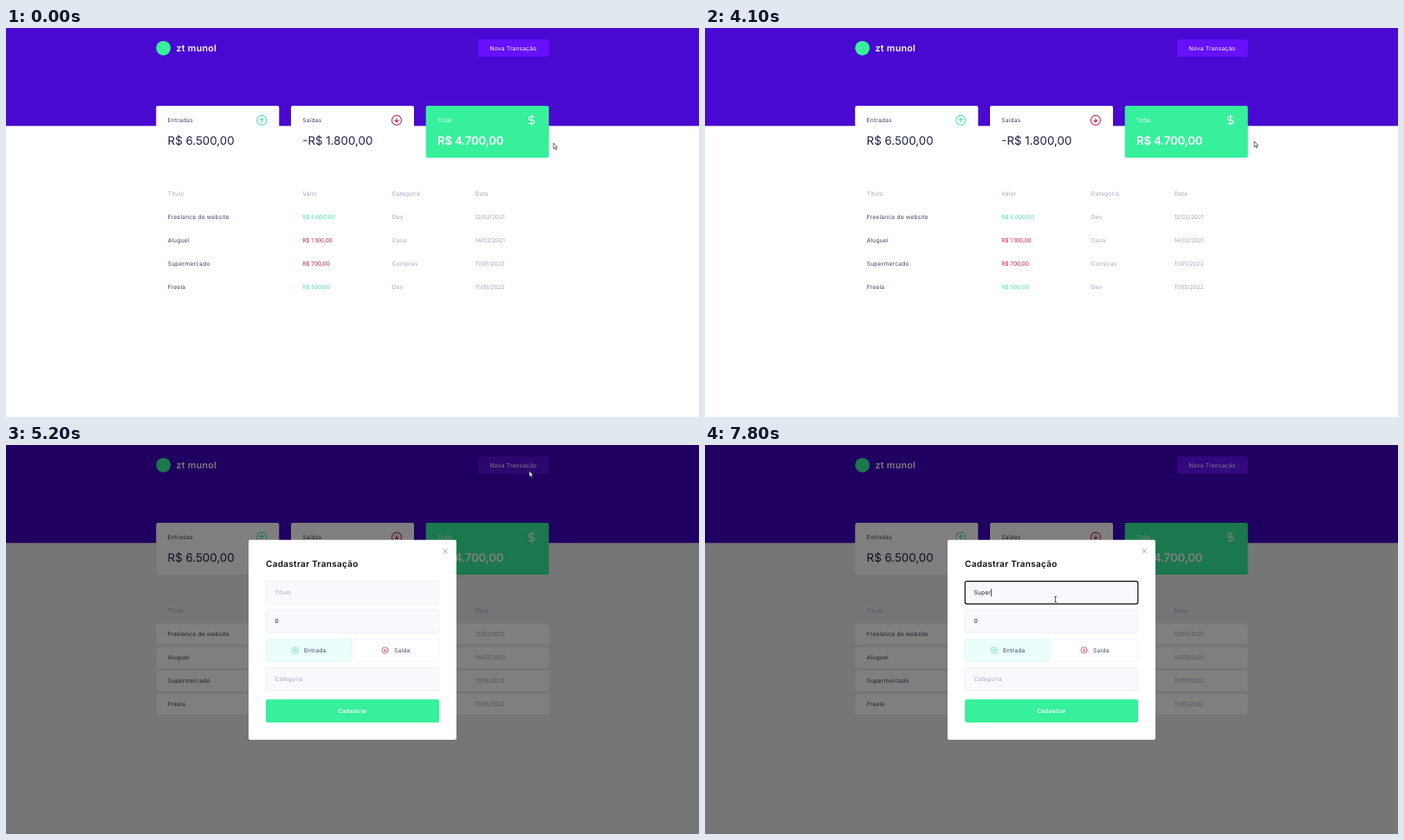
An HTML page that plays this animation: 800 by 450 pixels, repeating every 8000 ms.

```html
<!DOCTYPE html>
<html lang="pt-BR">
<head>
<meta charset="utf-8">
<title>Transações</title>
<style>
  html, body { margin: 0; width: 100%; height: 100%; overflow: hidden; }
  svg { display: block; width: 100vw; height: 100vh; --page: #fff; --head: #4a09d1; }
  svg.open { --page: #ecedf1; --head: #3e00c4; }
  text {
    font: 400 6.67px Inter, "Open Sans", sans-serif;
    letter-spacing: .03em;
    text-rendering: geometricPrecision;
    white-space: pre;
  }
  .num { letter-spacing: -.015em; }
  .big { font-size: 13.33px; letter-spacing: 0; }
  .bold { font-weight: 600; }
  .total { font-weight: 600; letter-spacing: -.02em; }
  .line { fill: none; stroke-linecap: round; stroke-linejoin: round; }
</style>
</head>
<body>
<svg id="stage" viewBox="0 0 800 450"></svg>
<script>
const LOOP = 8000, STEP = 100;
const DARK = '#3b4160', INK = '#1d2048', MUTED = '#a3a6bf';
const GREEN = '#36f09b', MINT = '#4fe0b0', RED = '#c22350';
const stage = document.getElementById('stage');

function add(parent, tag, attrs = {}, content = '') {
  const el = document.createElementNS('http://www.w3.org/2000/svg', tag);
  for (const key in attrs) el.setAttribute(key, attrs[key]);
  el.textContent = content;
  return parent.appendChild(el);
}
const box = (parent, x, y, width, height, fill, rx = 0, more = {}) =>
  add(parent, 'rect', { x, y, width, height, fill, rx, ...more });
const label = (parent, x, y, content, fill, cls = '', more = {}) =>
  add(parent, 'text', { x, y, fill, class: cls, ...more }, content);

// Icons live on a 24-unit grid, centred on (x, y).
const DOLLAR = 'M12 1V23M17 5H9.5a3.5 3.5 0 0 0 0 7h5a3.5 3.5 0 0 1 0 7H6';
const RING = 'M22 12a10 10 0 1 1-20 0a10 10 0 1 1 20 0';
const UP = RING + 'M16 12l-4-4l-4 4M12 16V8';
const DOWN = RING + 'M8 12l4 4l4-4M12 8v8';
function icon(parent, x, y, size, d, stroke) {
  const s = size / 24;
  add(parent, 'path', {
    d, stroke, 'stroke-width': 1.9, class: 'line',
    transform: `translate(${x - size / 2} ${y - size / 2}) scale(${s})`
  });
}

// Page
const page = add(stage, 'g');
box(page, 0, 0, 800, 450, 'var(--page)');
box(page, 0, 0, 800, 113.3, 'var(--head)');
add(page, 'circle', { cx: 181.7, cy: 23.3, r: 8.4, fill: GREEN });
label(page, 196.5, 27, 'zt munol', '#fff', 'bold', { style: 'font-size:10.6px' });
const newButton = box(page, 545.3, 13.3, 81.4, 20, '#6610ff', 2);
label(page, 558.6, 25.8, 'Nova Transação', '#fff');

[
  ['Entradas', 'R$ 6.500,00', UP, MINT],
  ['Saídas', '-R$ 1.800,00', DOWN, RED],
  ['Total', 'R$ 4.700,00', DOLLAR, '#fff']
].forEach(([name, value, shape, color], i) => {
  const x = 173.3 + i * 155.7, total = i === 2;
  box(page, x, 90, 142, 60, total ? GREEN : '#fff', 2);
  label(page, x + 13.3, 109.2, name, total ? '#fff' : DARK);
  label(page, x + 13.3, 134.7, value, total ? '#fff' : INK, total ? 'big total' : 'big');
  icon(page, x + 122, 106.7, 13.33, shape, color);
});

const columns = [186.7, 342.2, 445.7, 541.7];
['Título', 'Valor', 'Categoria', 'Data'].forEach((name, i) =>
  label(page, columns[i], 193.8, name, MUTED));
[
  ['Freelance de website', 'R$ 6.000,00', 'Dev', '12/02/2021', MINT],
  ['Aluguel', 'R$ 1.100,00', 'Casa', '14/02/2021', RED],
  ['Supermercado', 'R$ 700,00', 'Compras', '11/05/2022', RED],
  ['Freela', 'R$ 500,00', 'Dev', '11/05/2022', MINT]
].forEach((row, i) => {
  const y = 206.8 + i * 27.08;
  box(page, 173.3, y, 453.4, 23.8, '#fff', 3);
  [DARK, row[4], MUTED, MUTED].forEach((color, c) =>
    label(page, columns[c], y + 14.2, row[c], color, c % 2 ? 'num' : ''));
});

// Dialog
const dialog = add(stage, 'g');
box(dialog, 0, 0, 800, 450, '#000', 0, { opacity: .5 });
box(dialog, 280, 109.7, 240, 231.3, '#fff', 2);
add(dialog, 'path', {
  d: 'M504.6 120.2l5 5m0-5l-5 5', stroke: '#8f919c', 'stroke-width': .8, class: 'line'
});
label(dialog, 300, 140.5, 'Cadastrar Transação', '#0b0b12', 'bold', { style: 'font-size:10px' });

const field = y => box(dialog, 300.2, y, 199.6, 26.2, '#f9f9fe', 2,
  { stroke: '#e6e6ef', 'stroke-width': .6 });
const titleField = field(157.6);
field(191);
field(257.6);
const titleText = label(dialog, 310.4, 173, '', MUTED);
label(dialog, 310.4, 206.4, '0', '#181820');
label(dialog, 310.4, 273, 'Categoria', MUTED);
const caret = box(dialog, 310.4, 166.4, .7, 9, '#111');

[
  ['Entrada', UP, MINT, '#eafffb', '#d2f3ec', 300.2, 333.5],
  ['Saída', DOWN, RED, '#fff', '#efeff3', 401.4, 437.6]
].forEach(([name, shape, color, fill, stroke, x, iconX]) => {
  box(dialog, x, 224.4, 98.4, 26.2, fill, 2, { stroke, 'stroke-width': .6 });
  icon(dialog, iconX, 237.5, 8.6, shape, color);
  label(dialog, iconX + 10.4, 239.8, name, DARK);
});
box(dialog, 300, 294.2, 200, 26.7, GREEN, 2);
label(dialog, 400, 309.6, 'Cadastrar', '#fff', 'bold', { 'text-anchor': 'middle' });

// Pointers, each drawn around its hotspot
const outline = { fill: '#fff', stroke: '#2b2b38', 'stroke-width': .7, 'stroke-linejoin': 'round' };
const pointers = {
  arrow: add(stage, 'path', { ...outline, d: 'M0 0V6.6L1.5 5.3L2.6 7.7L3.7 7.2L2.6 4.9H4.6Z' }),
  hand: add(stage, 'path', {
    ...outline, 'stroke-width': .4,
    d: 'M-.8 .2Q0-.8 .8 .2V3.2Q1.6 2.6 2.2 3.4Q3 2.9 3.5 3.7Q4.6 3.3 4.7 4.6V6.8L3.8 9.3H-.3L-2.8 5.6Q-2.6 4.3-.8 5.5Z'
  }),
  beam: add(stage, 'path', {
    class: 'line', stroke: '#222', 'stroke-width': .7,
    d: 'M-1.4-3.2Q-.2-3.2 0-2.6Q.2-3.2 1.4-3.2M0-2.6V2.8M-1.4 3.4Q-.2 3.4 0 2.8Q.2 3.4 1.4 3.4'
  })
};

// Pointer path: time, x, y
const path = [
  [0, 632, 133.2], [500, 633, 132], [4000, 633, 132], [4100, 634, 131],
  [4200, 636, 126], [4300, 639, 112], [4400, 640, 90], [4500, 634, 66],
  [4600, 622, 46], [4700, 612, 35], [4800, 607, 31], [4900, 606, 30],
  [5100, 606, 30], [5200, 604, 30], [5300, 600, 32], [5400, 580, 47],
  [5600, 492, 112], [5700, 450, 144], [5800, 426, 166], [6000, 411, 178.5],
  [6300, 404.5, 178.5], [LOOP, 404.5, 178.5]
];
const OPEN = 5200, FOCUS = 6100, BLINK = 6600;
const typed = [[6800, 'S'], [7000, 'Su'], [7200, 'Sup'], [7300, 'Supe'], [7500, 'Super']];

function pointerAt(t) {
  const i = path.findIndex(p => p[0] > t);
  const [t0, x0, y0] = path[i - 1], [t1, x1, y1] = path[i];
  const k = (t - t0) / (t1 - t0);
  return [x0 + (x1 - x0) * k, y0 + (y1 - y0) * k];
}
const clamp = v => Math.max(0, Math.min(1, v));
const show = (el, on) => el.setAttribute('visibility', on ? 'visible' : 'hidden');

function draw(now) {
  const t = Math.floor(now % LOOP / STEP) * STEP;
  const open = t >= OPEN, focused = t >= FOCUS;
  const [x, y] = pointerAt(t);

  const kind = t >= 5800 ? 'beam' : t >= 4800 && !open ? 'hand' : 'arrow';
  for (const name in pointers) {
    show(pointers[name], name === kind);
    pointers[name].setAttribute('transform', `translate(${x} ${y})`);
  }

  const hover = clamp((t - 4700) / 200) - clamp((t - 5300) / 200);
  newButton.style.filter = `brightness(${1 - .12 * hover})`;

  stage.classList.toggle('open', open);
  dialog.style.display = open ? '' : 'none';
  if (open) {
    const text = typed.reduce((last, [at, s]) => t >= at ? s : last, '');
    titleText.textContent = text || 'Título';
    titleText.setAttribute('fill', text ? '#181820' : MUTED);
    titleField.setAttribute('stroke', focused ? '#0a0a0f' : '#e6e6ef');
    titleField.setAttribute('stroke-width', focused ? 1.2 : .6);
    caret.setAttribute('x', 310.3 + (text ? titleText.getComputedTextLength() : 0));
    show(caret, focused && (t < BLINK || text));
  }
  requestAnimationFrame(draw);
}
draw(0);
</script>
</body>
</html>
```
